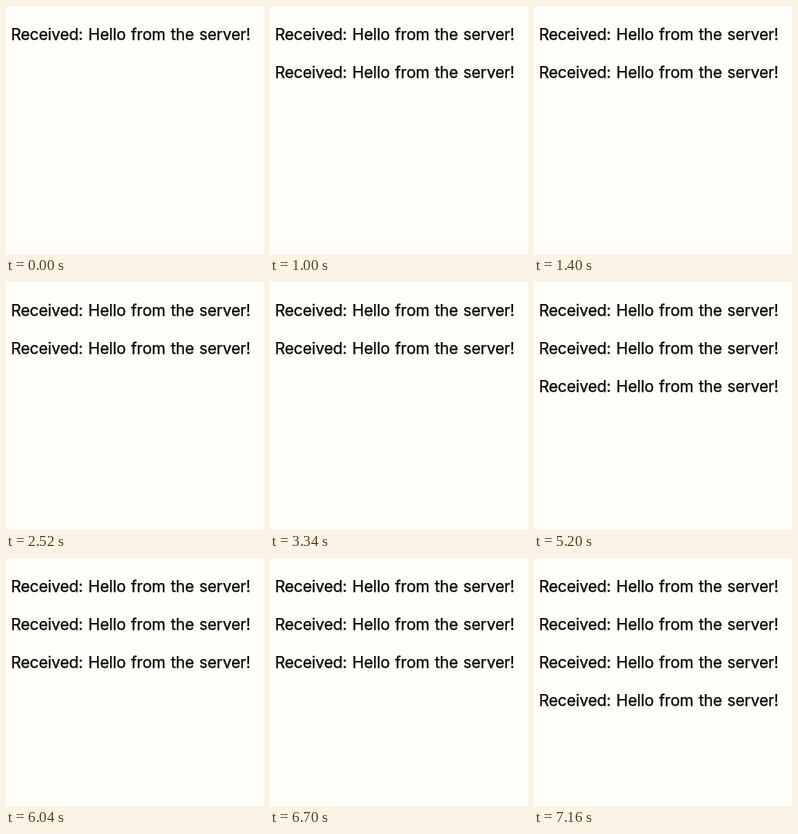
Animation, 258 px wide and 248 px high, one loop 8 s. Source, as an HTML page:

```html
<!DOCTYPE html>
<html lang="en">
<head>
<meta charset="utf-8">
<title>Server messages</title>
<style>
  html, body {
    margin: 0;
    width: 100%;
    height: 100%;
    overflow: hidden;
    background: #fffefb;
  }
  svg { display: block; }
  text {
    font: 15.75px Inter, Roboto, sans-serif;
    letter-spacing: -0.09px;
    word-spacing: 0.9px;
    fill: #000;
    stroke: #000;
    stroke-width: 0.25px;
  }
  .second { animation: second 8s step-end infinite; }
  .third { animation: third 8s step-end infinite; }
  .fourth { animation: fourth 8s step-end infinite; }

  /* Each message arrives about 2.9 s after the previous one. */
  @keyframes second { 0% { opacity: 0; } 12.5%, 100% { opacity: 1; } }
  @keyframes third { 0% { opacity: 0; } 48.75%, 100% { opacity: 1; } }
  @keyframes fourth { 0% { opacity: 0; } 85.5%, 100% { opacity: 1; } }
</style>
</head>
<body>
<svg width="258" height="248" viewBox="0 0 258 248">
  <text x="4.9" y="34">Received: Hello from the server!</text>
  <text class="second" x="4.9" y="72">Received: Hello from the server!</text>
  <text class="third" x="4.9" y="110">Received: Hello from the server!</text>
  <text class="fourth" x="4.9" y="148">Received: Hello from the server!</text>
</svg>
</body>
</html>
```
